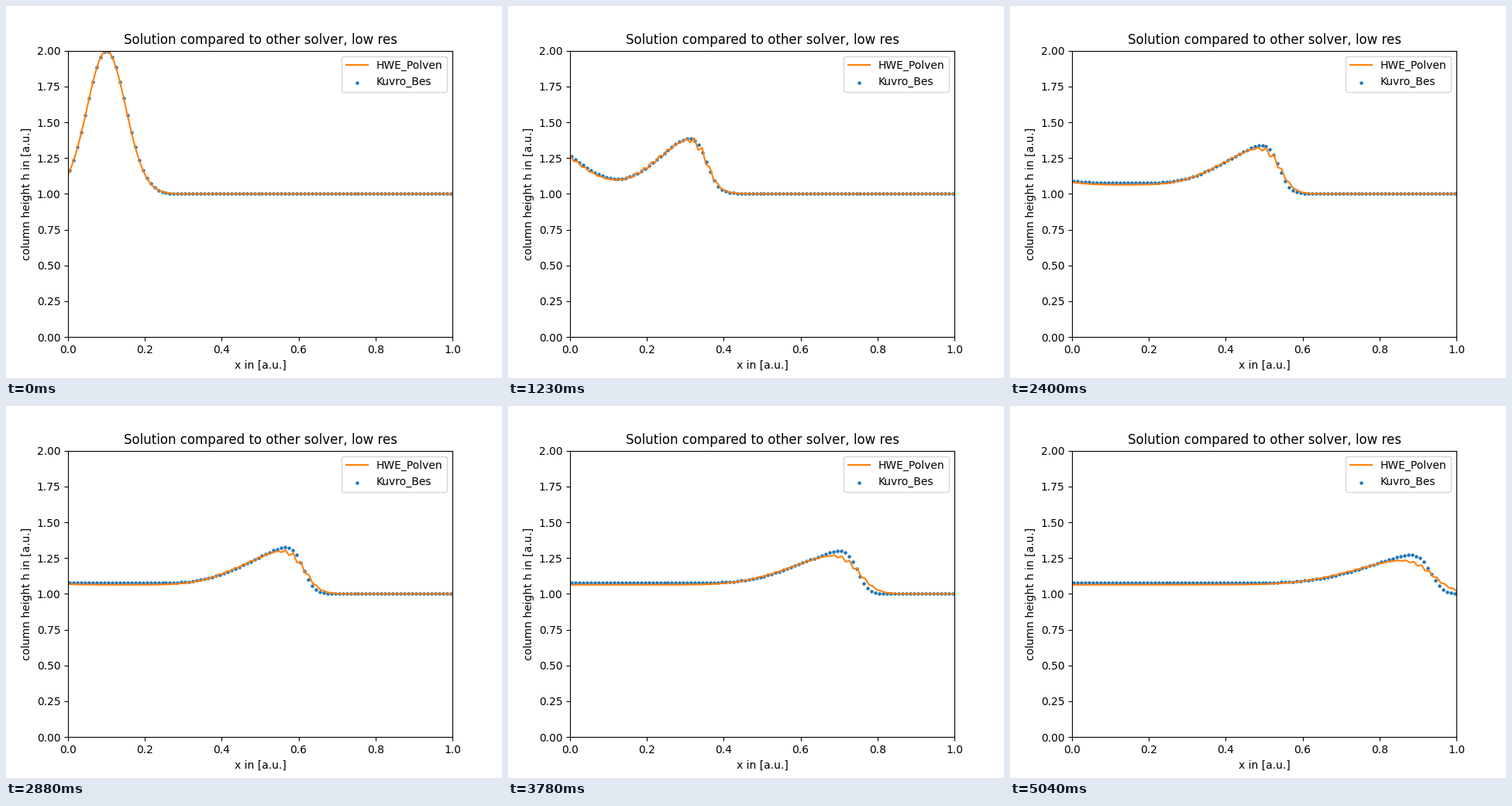
A matplotlib script that plays this animation: 640x480 px, repeating every 5070 ms.

```python
import numpy as np
import matplotlib.pyplot as plt
from matplotlib.animation import FuncAnimation

FRAMES, INTERVAL = 169, 30
N, G = 100, 9.81
DT = 0.5 * 0.01 / np.sqrt(2 * G)  # half the Courant limit of the start state


def bump(x):
    return 1 + np.exp(-((x - 0.1) / 0.05) ** 2 / 2)


def step(h, hu, dx, visc):
    """One finite volume step with open ends; visc maps Courant number to damping."""
    h, hu = np.pad(h, 1, mode="edge"), np.pad(hu, 1, mode="edge")
    u = hu / h
    speed = np.abs(u) + np.sqrt(G * h)
    state = np.array([h, hu])
    flux = np.array([hu, hu * u + G * h * h / 2])
    courant = np.maximum(speed[1:], speed[:-1]) * DT / dx
    face = (flux[:, 1:] + flux[:, :-1]) / 2
    face -= visc(courant) * dx / DT * np.diff(state) / 2
    return state[:, 1:-1] - DT / dx * np.diff(face)


def solve(x, visc):
    h, hu = bump(x), np.zeros_like(x)
    heights = [h]
    for n in range(FRAMES - 1):
        h, hu = step(h, hu, x[1] - x[0], lambda c: visc(c, n))
        heights.append(h)
    return heights


def stairs(h, n):
    """Odd-even decoupling: neighbouring points pair up on slopes."""
    i = np.arange(N)
    slope = np.gradient(h)[np.minimum(i + 2, N - 1)]
    return h - (-1.0) ** i * 0.5 * min(n / 40, 1) * slope


x_dots = (np.arange(N) + 0.5) / N
x_line = np.linspace(0, 1, N)
dots_h = solve(x_dots, lambda c, n: c)
line_h = solve(x_line, lambda c, n: c ** 2 + 0.24 * (1 + 0.0095 * n))

fig, ax = plt.subplots(figsize=(6.4, 4.8), dpi=100)
line, = ax.plot(x_line, line_h[0], color="C1", label="HWE_Polven")
dots = ax.scatter(x_dots, dots_h[0], s=5, color="C0", label="Kuvro_Bes")
ax.set(xlim=(0, 1), ylim=(0, 2), xlabel="x in [a.u.]",
       ylabel="column height h in [a.u.]",
       title="Solution compared to other solver, low res")
ax.legend(loc="upper right")


def draw(n):
    line.set_ydata(stairs(line_h[n], n))
    dots.set_offsets(np.column_stack([x_dots, dots_h[n]]))
    return line, dots


anim = FuncAnimation(fig, draw, frames=FRAMES, interval=INTERVAL,
                     repeat=True, repeat_delay=0)
plt.show()
```
